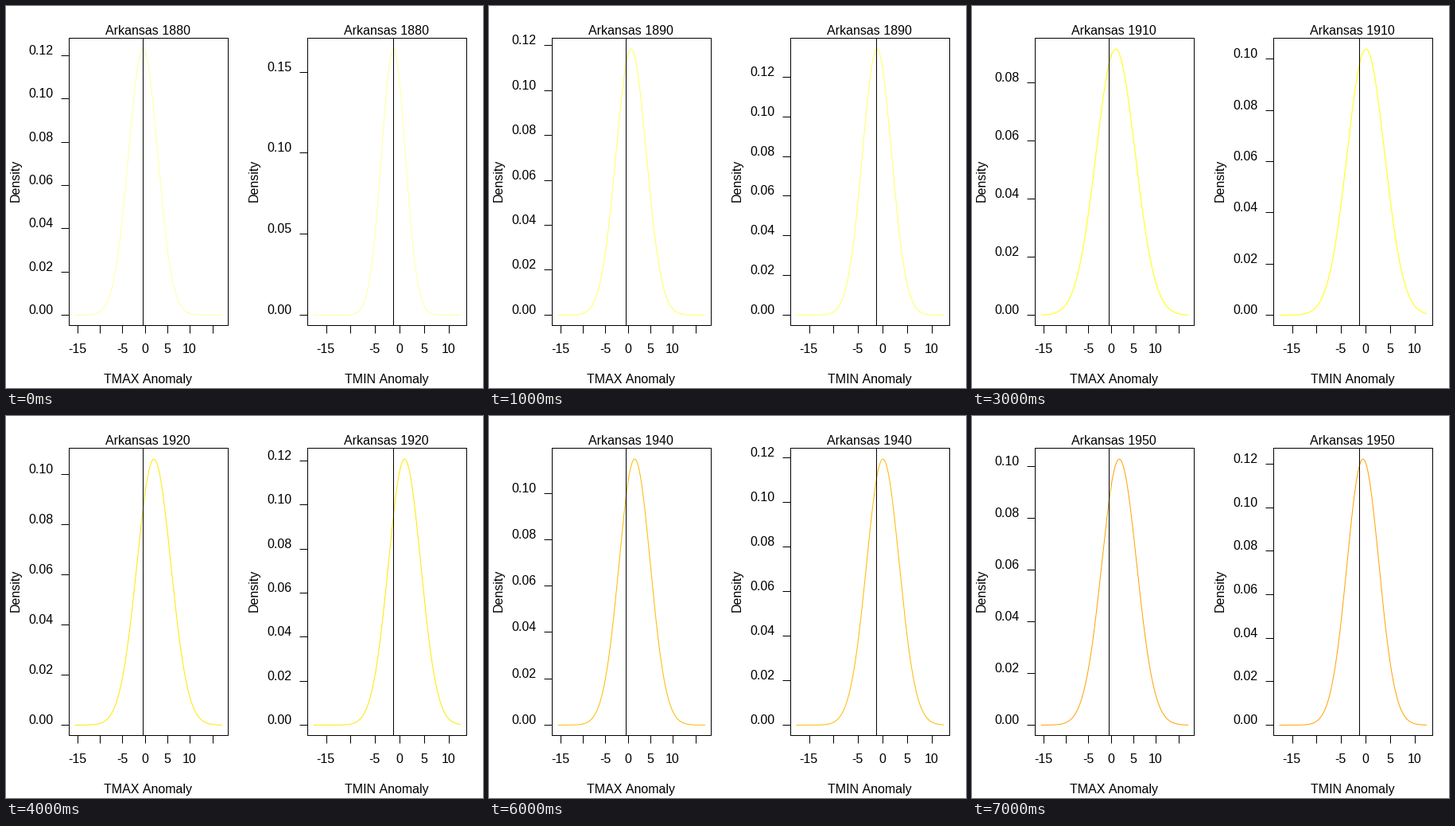
Recreate the animation shown at these times as a matplotlib script. Size 600 px wide and 480 px high, loop 8000 ms.

```python
import colorsys

import matplotlib.pyplot as plt
import numpy as np
from matplotlib.animation import FuncAnimation

W, H, DPI = 600, 480, 100
PX = 72 / DPI                      # one pixel in points
LEFT, RIGHT, TOP, BOTTOM = 79, 279, 40, 401
BASE, CURVE_H = 388.4, 334.2       # lowest curve point and curve height
TICK, MIDDLE = 10, 178.8
START, DECADES = 1880, 8

plt.rcParams["font.family"] = "Liberation Sans"
plt.rcParams["font.size"] = 16 * PX

fig = plt.figure(figsize=(W / DPI, H / DPI), dpi=DPI, facecolor="white")
ax = fig.add_axes([0, 0, 1, 1])
ax.set_xlim(0, W)
ax.set_ylim(H, 0)
ax.axis("off")


def stroke(xs, ys, color="black", z=2, snap=None):
    line, = ax.plot(xs, ys, color=color, lw=PX, zorder=z, snap=snap,
                    solid_capstyle="butt", solid_joinstyle="round")
    return line


def segment(x0, y0, x1, y1, z=2):
    """Crisp line between two pixels; snapping centres it on them."""
    return stroke([x0, x1], [y0, y1], z=z, snap=True)


def label(x, y, text, ha="center", **kw):
    return ax.text(x, y, text, ha=ha, va="baseline", color="black", **kw)


def heat(k):
    """Pale yellow through yellow to orange."""
    if k < 3:
        return colorsys.hsv_to_rgb(1 / 6, .375 + .25 * k, 1)
    return (1, 1 - (k - 3) / 11, 0)


def pdf(x, mean, sd):
    return np.exp(-((x - mean) / sd) ** 2 / 2) / (sd * np.sqrt(2 * np.pi))


class Panel:
    def __init__(self, dx, name, zero, scale, last_tick, mark, means, sds):
        self.dx, self.means, self.sds = dx, means, sds
        self.px = np.linspace(86.6, 272, 260) + dx
        self.x = (self.px - zero - .5) / scale
        l, r = LEFT + dx, RIGHT + dx

        stroke([l, r, r, l, l], [TOP, TOP, BOTTOM, BOTTOM, TOP], snap=True)
        for t in range(-15, last_tick + 1, 5):
            x = zero + scale * t
            segment(round(x), BOTTOM, round(x), BOTTOM + TICK)
            if t not in (-10, 15):
                label(x - .4, 436, str(t))
        segment(mark, TOP, mark, BOTTOM, z=4)
        # the no-break space avoids kerning before the capital
        label(MIDDLE + dx, 474, name + "\u00a0Anomaly")
        label(dx + 16.5, 219.5, "Density", rotation=90,
              rotation_mode="anchor")

        self.title = label(MIDDLE + dx, 36, "")
        self.curve = stroke([], [], z=3)
        self.marks = []

    def draw(self, k):
        for m in self.marks:
            m.remove()
        self.marks = []

        year = START + 10 * k
        p = pdf(self.x, np.interp(year, KEY_YEARS, self.means),
                np.interp(year, KEY_YEARS, self.sds))
        low, peak = p.min(), p.max()

        def to_y(v):
            return BASE - CURVE_H * (v - low) / (peak - low)

        self.curve.set_data(self.px, to_y(p))
        self.curve.set_color(heat(k))
        self.title.set_text(f"Arkansas {year}")

        step = .05 if peak > .16 else .02
        for v in np.arange(0, .2, step):
            row = int(to_y(v))
            if row < TOP:
                break
            self.marks += [
                segment(LEFT - TICK + self.dx, row, LEFT + self.dx, row),
                label(59.5 + self.dx, row - 1, f"{v:.2f}", ha="right")]


# bell curves at key years, blended in between
KEY_YEARS = (1880, 1900, 1910, 1920, 1940, 1950)
panels = [
    Panel(0, "TMAX", 174.8, 5.667, 15, 172,
          means=(-.5, 1.75, .95, 1.9, 1.4, 1.75),
          sds=(3.24, 3.5, 4.36, 3.76, 3.475, 3.88)),
    Panel(300, "TMIN", 495, 6.16, 10, 487,
          means=(-1.33, -1.1, 0, .95, 0, -.6),
          sds=(2.43, 3.52, 3.84, 3.3, 3.34, 3.26)),
]


def update(k):
    for panel in panels:
        panel.draw(k)
    return []


anim = FuncAnimation(fig, update, frames=DECADES, interval=1000,
                     repeat=True, repeat_delay=0, blit=False)
plt.show()
```
